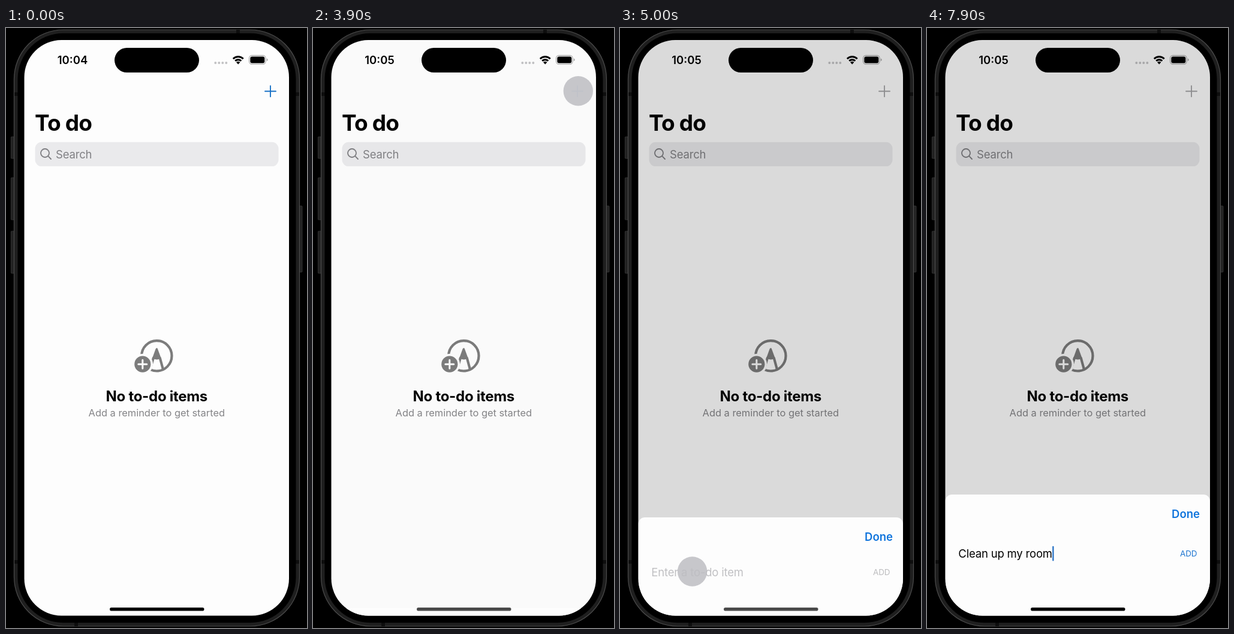
Recreate the animation shown at these times as an HTML page. Size 502x998 px, loop 8 s.

```html
<!DOCTYPE html>
<html lang="en">
<head>
<meta charset="utf-8">
<title>To do</title>
<style>
  html, body { margin: 0; width: 100%; height: 100%; overflow: hidden; background: #000; }
  svg { display: block; width: 100%; height: 100%; }
  text { font: 400 18.5px Inter, "Open Sans", sans-serif; letter-spacing: -.01em; white-space: pre; }
  .semibold { font-weight: 600; letter-spacing: 0; }
  .title { font-size: 37px; font-weight: 700; letter-spacing: -.022em; }
  .heading { font-size: 24px; font-weight: 700; letter-spacing: -.012em; }
  .caption { font-size: 16.4px; letter-spacing: 0; }
  .small { font-size: 13.4px; letter-spacing: 0; }
  .middle { text-anchor: middle; }
  .end { text-anchor: end; }
  .line { fill: none; stroke-linecap: round; stroke-linejoin: round; }
</style>
</head>
<body>
<svg viewBox="0 0 502 998">
  <defs>
    <clipPath id="screen"><rect x="30.5" y="20" width="441.5" height="957.5" rx="62"/></clipPath>
  </defs>
  <rect width="502" height="998"/>

  <!-- phone body -->
  <g fill="#222" stroke="#3a3a3a" stroke-width=".8">
    <rect x="8.4" y="181" width="6" height="36" rx="1"/>
    <rect x="8.4" y="249" width="6" height="70" rx="1"/>
    <rect x="8.4" y="338" width="6" height="70" rx="1"/>
    <rect x="488" y="296" width="6" height="110" rx="1"/>
  </g>
  <rect x="13.5" y="3" width="476" height="992" rx="82" fill="#1f1f1f" stroke="#4c4c4c" stroke-width="1.2"/>
  <g fill="#0e0e0e">
    <rect x="384" y="3" width="6" height="6"/>
    <rect x="114" y="989" width="6" height="6"/>
    <rect x="14" y="107" width="6" height="6"/>
    <rect x="483" y="107" width="6" height="6"/>
    <rect x="14" y="885" width="6" height="6"/>
    <rect x="483" y="885" width="6" height="6"/>
  </g>
  <rect x="19.5" y="8.8" width="464" height="980.4" rx="76"/>

  <g clip-path="url(#screen)">
    <rect x="30" y="20" width="443" height="959" fill="#fdfdfd"/>

    <!-- status bar -->
    <text class="semibold middle" id="clock" x="111" y="60">10:04</text>
    <rect x="181" y="33" width="141" height="41" rx="20.5"/>
    <path class="line" d="M349.3 58H368" stroke="#c2c2c4" stroke-width="4" stroke-dasharray="0 6"/>
    <g class="line" stroke="#000" stroke-width="2.9" style="stroke-linecap:butt">
      <path d="M378.8 51.2a12 12 0 0 1 16.9 0"/>
      <path d="M382.2 54.8a7.2 7.2 0 0 1 10.1 0"/>
    </g>
    <path d="M387.2 60.4l-3.2-3.3a4.6 4.6 0 0 1 6.4 0z"/>
    <rect x="405.5" y="45.6" width="27.6" height="14.6" rx="4.6" fill="none" stroke="#a3a3a3" stroke-width="1.1"/>
    <rect x="407.3" y="47.4" width="24" height="11" rx="3"/>
    <path d="M434.8 50.6q1.9 .7 1.9 2.3t-1.9 2.3z" fill="#a3a3a3"/>

    <path id="plus" class="line" d="M432 105.3H450M441 96.3V114.3" stroke-width="1.9"/>
    <text class="title" x="48" y="171">To do</text>

    <rect x="48.5" y="189.7" width="406" height="40.4" rx="11" fill="#eaeaec"/>
    <path class="line" d="M70.3 213.2L75 218M72 208a7 7 0 1 0 -14 0a7 7 0 1 0 14 0" stroke="#7e7e82" stroke-width="1.8"/>
    <text x="83" y="217" fill="#808084">Search</text>

    <!-- empty state -->
    <g class="line" stroke="#7c7c7c" stroke-width="4.2">
      <circle cx="251.3" cy="545.3" r="25.2"/>
      <path d="M245.8 549L240.5 568M256.8 549L262 568"/>
      <path d="M251.3 534L246 548.5Q251.3 551 256.6 548.5Z" fill="#7c7c7c" stroke-width="3.4"/>
    </g>
    <circle cx="227.8" cy="559.2" r="17.2" fill="#fdfdfd"/>
    <circle cx="227.8" cy="559.2" r="13.6" fill="#7c7c7c"/>
    <path class="line" d="M220.8 559.2H234.8M227.8 552.2V566.2" stroke="#fdfdfd" stroke-width="3"/>
    <text class="heading middle" x="251.3" y="621">No to-do items</text>
    <text class="caption middle" x="251.3" y="646" fill="#848487">Add a reminder to get started</text>

    <rect id="dim" x="30" y="20" width="443" height="959"/>

    <!-- sheet, drawn from its own top edge -->
    <g id="sheet">
      <rect x="30.5" width="441.5" height="240" rx="11" fill="#fdfdfd"/>
      <text class="semibold end" x="455" y="39" fill="#0f74dc">Done</text>
      <g id="field">
        <text id="entry" x="52.3" y="6.8"></text>
        <text id="add" class="small end" x="450.5" y="4.6">ADD</text>
        <rect id="caret" y="-12.2" width="2.3" height="24.6" rx="1" fill="#2470c4"/>
      </g>
    </g>

    <circle id="touch" r="24.7" fill="#bebec2"/>
    <rect id="home" x="173" y="964" width="157.5" height="5.6" rx="2.8"/>
  </g>
</svg>

<script>
  const LOOP = 8000, STEP = 100;
  const MESSAGE = "Clean up my room", HINT = "Enter a to-do item";
  const el = Object.fromEntries([...document.querySelectorAll("[id]")].map(e => [e.id, e]));
  const set = (node, attrs) => {
    for (const name in attrs) node.setAttribute(name, attrs[name]);
  };

  // Critically damped spring from 0 to 1.
  const spring = (time, rate) => {
    const x = Math.max(0, time) * rate;
    return 1 - (1 + x) * Math.exp(-x);
  };

  // Linear interpolation through [time, value] points.
  const track = (t, points) => {
    const i = points.findIndex(p => p[0] > t);
    if (i === 0) return points[0][1];
    if (i < 0) return points.at(-1)[1];
    const [t0, a] = points[i - 1], [t1, b] = points[i];
    return a + (b - a) * (t - t0) / (t1 - t0);
  };

  const touchLevel = [
    [1700, 0], [1900, 1], [2400, 1], [2600, .2], [2900, .2], [3000, 0], [3300, 1],
    [4300, 1], [4500, 0], [4700, 0], [4900, 1], [5100, 1], [5300, 0]
  ];

  const touchPoint = t =>
    t < 2600 ? [400.5, 360.4] :
    t < 3000 ? [400.5, 345.5] :
    t < 4600 ? [442.3, track(t, [[3000, 109.5], [3500, 104.8]])] :
    [120.6, 904];

  // One letter per step, with a short pause after the second word.
  const typedCount = t => {
    if (t < 6300) return 0;
    const first = Math.min(8, (t - 6200) / STEP);
    return first + Math.max(0, (t - 7100) / STEP);
  };

  function render(t) {
    const open = spring(t - 3876, .0193);
    const lift = spring(t - 5548, .0135);
    const typed = typedCount(t);

    el.clock.textContent = t < 3300 ? "10:04" : "10:05";
    set(el.dim, { opacity: .138 * open });
    set(el.sheet, { transform: `translate(0 ${978 - 164 * open - 38 * lift})` });
    set(el.field, { transform: `translate(0 ${t < 5600 ? 91 : 98})` });
    set(el.home, { fill: t >= 3900 && t < 5500 ? "#4a4a4a" : "#000" });

    set(el.plus, {
      stroke: t < 4000 ? "#1a72c6" : "#a5a5a7",
      opacity: t < 4000 ? track(t, [[3300, 1], [3500, .2]]) : 1
    });

    const [x, y] = touchPoint(t);
    set(el.touch, { cx: x, cy: y, opacity: .85 * track(t, touchLevel) });

    el.entry.textContent = typed ? MESSAGE.slice(0, typed) : HINT;
    set(el.entry, { fill: typed ? "#000" : "#c0c0c3" });
    set(el.add, { fill: typed ? "#1c74d0" : "#bcbcbe" });
    set(el.caret, {
      x: typed ? 52.6 + el.entry.getComputedTextLength() : 52.6,
      opacity: t < 5500 ? 0 : 1
    });
  }

  const start = performance.now();
  function tick() {
    const elapsed = (performance.now() - start) % LOOP;
    render(Math.floor(elapsed / STEP) * STEP);
    requestAnimationFrame(tick);
  }
  tick();
</script>
</body>
</html>
```
